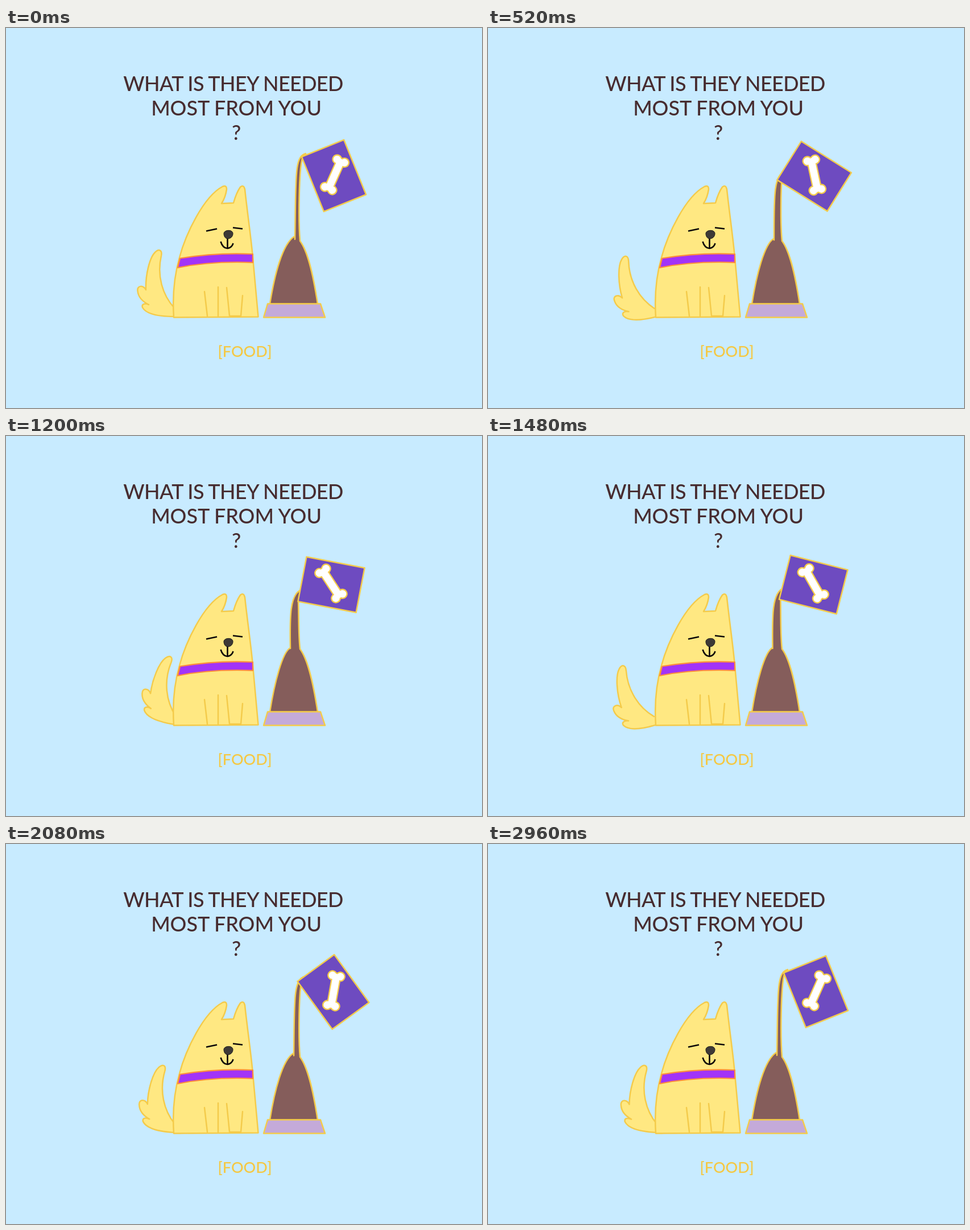
Write an HTML page that moves like this. It is 837 px wide and 669 px high and loops after 3000 ms.

```html
<!DOCTYPE html>
<html lang="en">
<head>
<meta charset="utf-8">
<title>Dog and food</title>
<style>
  html, body { margin: 0; width: 100%; height: 100%; overflow: hidden; background: #c8ebff; }
  svg { display: block; width: 837px; height: 669px; }
  text { font-family: Lato, "Open Sans", sans-serif; font-weight: 500; text-anchor: middle; }
  .title { font-size: 36px; fill: #472c30; }
  .label { font-size: 27px; fill: #f5c843; }
  .gold { stroke: #f4cb4b; stroke-width: 2.5; }
  .fur { fill: #ffe882; }
  .ink { stroke: #0c0808; stroke-width: 2.6; fill: none; }
</style>
</head>
<body>
<svg viewBox="0 0 837 669" stroke-linejoin="round">
  <text class="title" x="399.500" y="111" letter-spacing="-.65">WHAT IS THEY NEEDED</text>
  <text class="title" x="405" y="154" letter-spacing="-.1">MOST FROM YOU</text>
  <text class="title" x="405" y="197">?</text>
  <text class="label" x="420" y="579">[FOOD]</text>

  <path id="tail" class="fur gold" stroke-linecap="round" d="M296 493 C275 470 265 436 273 401 C275 391 269 388 262 395
    C252 405 245 436 246 461 C241 452 230 453 231.500 463 C232.500 474 241 482 251 487
    C244 484 238 486 240 492 C246 503 268 508 297 508"/>

  <path class="fur gold" d="M295 509.500 C292 465 297 432 305 404 C316 363 347 297 381 279 Q388 276 388 284
    Q386 298 379 309 L400 308 Q405 290 412 280 Q418 275 420 284 C425 330 431 370 434 404 L443.500 508.500 Z"/>
  <path class="gold" fill="none" stroke-linecap="round"
    d="M349 464 L354 507 M373 456 V507 M388 457 L393 507 H413 L416 471"/>
  <path fill="#a233f8" stroke="#ff8c3a" stroke-width="2.2" d="M306 405.500 Q370 395 434 398 V412.800 Q360 410 302 422 Z"/>

  <path class="ink" d="M352 357.500 L371 353.500 M399 351.500 L416 353.500 M389.500 369 V387
    M377.500 376 Q381 387.500 389.500 388 Q397 387 399.500 379"/>
  <path fill="#3d3936" stroke="#1d1918" d="M383 362 C383 355 399 354 399 362 C399 367 395 371 390 371 C386 371 383 367 383 362 Z"/>

  <path id="food" class="gold" fill="#855d5b" stroke-linecap="round"/>
  <path class="gold" fill="#c4aad9" d="M460 485.500 H553 L561 509.500 H453 Z"/>

  <g id="bag">
    <rect class="gold" fill="#6e4bc0" x="-40" y="-52" width="80" height="104"/>
    <g transform="translate(2 -1) rotate(46)" stroke-linecap="round">
      <g stroke="#f4cb4b">
        <path stroke-width="17" d="M0 -24 V24"/>
        <path stroke-width="18" d="M-7 -26.500 h.01 M7 -26.500 h.01 M-7 26.500 h.01 M7 26.500 h.01"/>
      </g>
      <g stroke="#fff">
        <path stroke-width="12.5" d="M0 -24 V24"/>
        <path stroke-width="13.2" d="M-7 -26.500 h.01 M7 -26.500 h.01 M-7 26.500 h.01 M7 26.500 h.01"/>
      </g>
    </g>
  </g>
</svg>
<script>
const LOOP = 3000, STEP = 40;
const tail = document.getElementById('tail');
const food = document.getElementById('food');
const bag = document.getElementById('bag');

// Wag phase: [time ms, degrees, degrees per ms]; slow at both ends of the loop
const wag = [
  [0, 71, .18], [520, 255.5, .7], [1200, 766, .73], [1760, 1167, .69],
  [2080, 1377.4, .67], [2600, 1737.4, .62], [3000, 1871, .18]
];

function wagPhase(t) {
  const i = wag.findIndex(k => k[0] > t);
  const [t0, a, va] = wag[i - 1], [t1, b, vb] = wag[i];
  const d = t1 - t0, u = (t - t0) / d, v = 1 - u;
  return v * v * (1 + 2 * u) * a + u * u * (3 - 2 * u) * b + u * v * d * (v * va - u * vb);
}

// Tilt of the bag: eases out until 1200 ms, accelerates back until 2200 ms
function tilt(t) {
  if (t < 1200) return Math.sin(Math.PI / 2 * t / 1200);
  return t < 2200 ? 1 - ((t - 1200) / 1000) ** 2.2 : 0;
}

function draw(t) {
  const p = tilt(t);
  const mix = (a, b) => a + (b - a) * p;
  const pt = (x0, y0, x1, y1) => mix(x0, x1).toFixed(2) + ' ' + mix(y0, y1).toFixed(2) + ' ';

  const swing = -8.2 + 25.2 * Math.cos(wagPhase(t) * Math.PI / 180);
  tail.setAttribute('transform', `rotate(${swing} 297 507)`);

  bag.setAttribute('transform',
    `translate(${pt(576.5, 260, 572, 261.7)}) rotate(${mix(-22, -79.2)})`);

  food.setAttribute('d',
    'M' + pt(508, 372, 500, 374) +
    'C' + pt(510, 262, 499, 320) + pt(507, 226, 499, 278) + pt(527, 221, 519, 271) +
    'L' + pt(521, 229, 514, 291) +
    'C' + pt(515, 250, 515, 310) + pt(514, 340, 514, 350) + pt(517, 375, 517, 375) +
    'C532 395 541 440 548 486 H464 C472 435 486 380 ' + pt(507, 367, 500, 373));
}

function frame(now) {
  draw(Math.floor(now % LOOP / STEP) * STEP);
  requestAnimationFrame(frame);
}
draw(0);
requestAnimationFrame(frame);
</script>
</body>
</html>
```
